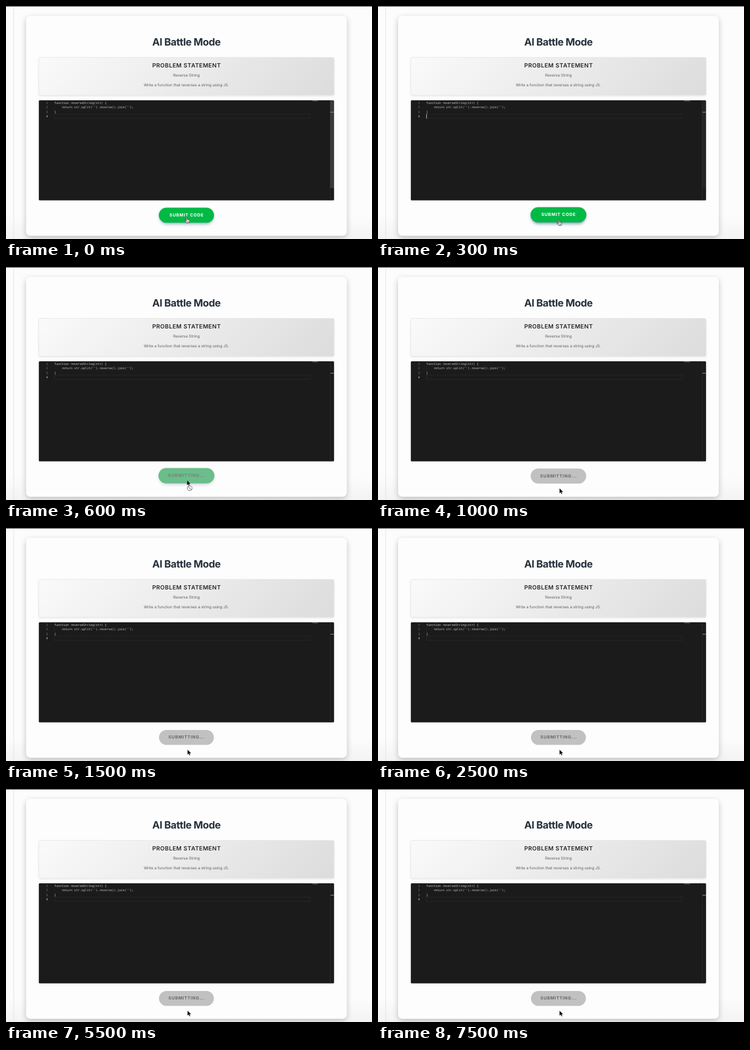
These frames come from a looping animation (600 px wide and 383 px high, 8 s). An HTML page:

```html
<!DOCTYPE html>
<html lang="en">
<head>
<meta charset="utf-8">
<title>AI Battle Mode</title>
<style>
  html, body { margin: 0; width: 100%; height: 100%; overflow: hidden; background: #fcfcfc; }
  svg { display: block; width: 100vw; height: 100vh; }
  text { font-family: Inter, Roboto, sans-serif; text-anchor: middle; text-rendering: geometricPrecision; }
  .code text { font: 4.92px "DejaVu Sans Mono", monospace; text-anchor: start; fill: #d0d0d0; white-space: pre; }
  .code .num { text-anchor: end; fill: #7c7c7c; }
  .code .now { fill: #c8c8c8; }
</style>
</head>
<body>
<svg viewBox="0 0 600 383" preserveAspectRatio="none">
  <defs>
    <linearGradient id="panel" gradientUnits="userSpaceOnUse" x1="160" y1="-20" x2="432" y2="252">
      <stop offset="0" stop-color="#fafafa"/>
      <stop offset="1" stop-color="#dcdcdc"/>
    </linearGradient>
    <linearGradient id="page" x2="0" y2="1">
      <stop offset=".9" stop-color="#fcfcfc"/>
      <stop offset="1" stop-color="#f3f3f3"/>
    </linearGradient>
    <filter id="cardShadow" x="-10%" y="-10%" width="120%" height="120%">
      <feDropShadow dx="0" dy="3" stdDeviation="5" flood-color="#000" flood-opacity=".24"/>
    </filter>
    <filter id="panelShadow" x="-5%" y="-20%" width="110%" height="140%">
      <feDropShadow dx="0" dy="1" stdDeviation="1.2" flood-color="#000" flood-opacity=".12"/>
    </filter>
    <filter id="blur" x="-20%" y="-50%" width="140%" height="200%">
      <feGaussianBlur stdDeviation="2.6"/>
    </filter>
  </defs>

  <rect width="600" height="383" fill="url(#page)"/>
  <path d="M12.7 0V383" stroke="#e4e4e4"/>
  <rect width="600" height="1" fill="#4a4a4a"/>
  <rect x="33" y="16.5" width="525.5" height="361" rx="7" fill="#fdfdfd" filter="url(#cardShadow)"/>

  <text x="295.8" y="64.8" font-size="16.6" font-weight="700" letter-spacing="-.43" fill="#25303b">AI Battle Mode</text>

  <rect x="53.8" y="84.4" width="484" height="62.4" rx="3" fill="url(#panel)" stroke="#e2e2e2" stroke-width=".7" filter="url(#panelShadow)"/>
  <text x="296" y="100.6" font-size="9.5" font-weight="600" letter-spacing=".4" fill="#262626">PROBLEM STATEMENT</text>
  <text x="295.8" y="116.1" font-size="6.35" fill="#5c5c5c">Reverse String</text>
  <text x="295.8" y="131.6" font-size="6.25" fill="#5c5c5c">Write a function that reverses a string using JS.</text>

  <rect x="53.8" y="155" width="484" height="164.5" rx="1.5" fill="#1b1b1b"/>
  <rect x="79.3" y="177.7" width="419.5" height="7.2" fill="none" stroke="#292929" stroke-width=".8"/>
  <path d="M91 163.5V170.5" stroke="#303030" stroke-width=".5" transform="translate(-11.4)"/>
  <path d="M531.4 155V319.5" stroke="#303030" stroke-width=".7"/>
  <rect id="slider" x="531.5" y="155" width="6.3" height="144.5" fill="#fff"/>
  <path d="M532 174.6H537.8" stroke="#a0a0a0" stroke-width=".9"/>
  <path d="M501 155.6H511M503 156.4H512" stroke="#777" stroke-width=".5"/>
  <g class="code" id="code"></g>
  <rect id="caret" x="79.2" y="177.6" width=".9" height="7.4" fill="#c8c8c8"/>

  <g id="button">
    <rect id="glow" x="-44" y="-10" width="88" height="24.5" rx="12.2" fill="#27508c" filter="url(#blur)"/>
    <rect id="pill" x="-45" y="-12.3" width="90" height="24.6" rx="12.3"/>
    <text id="label" x=".3" y="2" font-size="7" font-weight="700" letter-spacing=".62"></text>
  </g>

  <g id="hand" stroke="#222" stroke-width=".7" stroke-linejoin="round" stroke-linecap="round">
    <path fill="#fff" d="M-1 .9q0-.9 .8-.9t.8 .9v3l3.2 .7q1 .3 .9 1.3l-.5 2-.5 1.5h-4.2l-2.7-3.5q-.4-1 .5-1l1.7 1.3z"/>
    <path fill="none" stroke-width=".45" d="M.3 6.3V8M1.6 6.3V8M2.9 6.3V8"/>
  </g>
  <g id="arrow">
    <path fill="#111" stroke="#fff" stroke-width=".7" paint-order="stroke" d="M0 0V8.2L1.9 6.4 3.2 9.3 4.5 8.7 3.2 5.9H5.9Z"/>
    <g id="blocked" fill="#fff" stroke="#8a8a8a" stroke-width="1.1">
      <circle cx="4.5" cy="13" r="4"/>
      <path d="M1.7 10.2L7.3 15.8"/>
    </g>
  </g>
</svg>

<script>
const LOOP = 8000, STEP = 100;
const PRESS = 500, LEAVE = 800;
const $ = id => document.getElementById(id);
const show = (id, on) => $(id).setAttribute("visibility", on ? "visible" : "hidden");
const mix = (a, b, k) => `rgb(${a.map((v, i) => Math.round(v + (b[i] - v) * k))})`;

// Linear interpolation through [time, value] points
function track(t, points) {
  if (t <= points[0][0]) return points[0][1];
  for (let i = 1; i < points.length; i++) {
    const [t0, a] = points[i - 1], [t1, b] = points[i];
    if (t < t1) return a + (b - a) * (t - t0) / (t1 - t0);
  }
  return points[points.length - 1][1];
}

const lines = ["function reverseString(str) {", "    return str.split('').reverse().join('');", "}", ""];
$("code").innerHTML = lines.map((line, i) => {
  const y = 160.8 + i * 7.35;
  const indent = line.length - line.trimStart().length;
  return `<text class="num${i === 3 ? " now" : ""}" x="68.6" y="${y}">${i + 1}</text>` +
    `<text x="${79.3 + indent * 2.96}" y="${y}">${line.trimStart()}</text>`;
}).join("");

function render(time) {
  const t = Math.floor(time / STEP) * STEP;
  const sent = t >= PRESS;

  show("caret", t >= 100 && t < PRESS);
  $("slider").setAttribute("opacity", track(t, [[0, .13], [300, .04], [500, 0]]));

  const lift = track(t, [[0, .3], [200, .8], [300, .85], [600, 1], [800, 1], [1000, .6], [1300, 0]]);
  $("button").setAttribute("transform", `translate(295.8 ${344.3 - 1.2 * lift}) scale(${1 + .02 * lift})`);

  const fade = track(t, [[400, 0], [600, .55], [800, 1]]);
  $("pill").setAttribute("fill", mix([2, 185, 70], [193, 193, 193], fade));
  $("glow").setAttribute("opacity", track(t, [[0, .45], [300, .6], [500, .45], [600, .22], [900, 0]]));
  $("label").textContent = sent ? "SUBMITTING..." : "SUBMIT CODE";
  $("label").setAttribute("fill", sent ? mix([130, 165, 145], [104, 104, 104], fade) : "#fff");

  const x = track(t, [[0, 296.5], [600, 296.7], [1000, 297.6]]);
  const y = track(t, [[0, 347], [300, 351.3], [600, 350.6], [1000, 363.8], [1300, 364.4]]);
  for (const id of ["hand", "arrow"]) $(id).setAttribute("transform", `translate(${x} ${y})`);
  show("hand", !sent);
  show("arrow", sent);
  show("blocked", sent && t < LEAVE);
}

const start = performance.now();
function tick() {
  render((performance.now() - start) % LOOP);
  requestAnimationFrame(tick);
}
tick();
</script>
</body>
</html>
```
